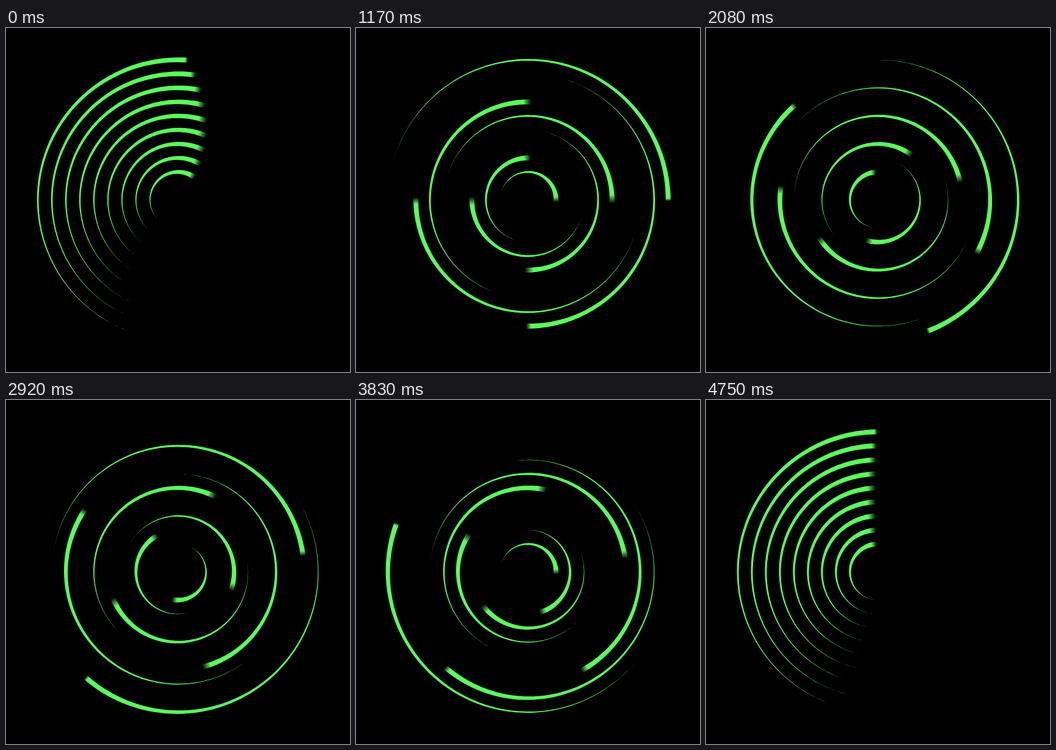
These frames come from a looping animation (540x540 px, 4.83 s). An HTML page with a canvas:

```html
<!DOCTYPE html>
<html lang="en">
<head>
<meta charset="utf-8">
<title>Green rings</title>
<style>
  html, body { margin: 0; width: 100%; height: 100%; overflow: hidden; background: #000; }
  canvas { display: block; width: 540px; height: 540px; }
</style>
</head>
<body>
<canvas id="stage" width="540" height="540"></canvas>
<script>
const ctx = document.getElementById('stage').getContext('2d');
const LOOP = 4830;        // ms
const CENTER = 270;
const RINGS = 9;
const GAP = 22;           // px between rings
const TRAIL = 165;        // degrees
const WIDTH = 7.8;        // px at the head
const BLUR = 0.6;         // half of the head's blur, degrees per turn
const STEPS = 110;
const rad = deg => (deg - 90) * Math.PI / 180;

// The picture holds at 12 steps per second, switching on whole centiseconds.
function stepAt(ms) {
  const next = Math.floor(ms * 0.012) + 1;
  return Math.round(next * 25 / 3) * 10 > ms ? next - 1 : next;
}

// Degrees turned by the slowest ring, moving in ticks of 33 ms.
function turnAt(step) {
  const tick = Math.ceil((step + 0.5) / 0.396) - 1;
  return tick * 2.47 + 0.95;
}

function strokeWidth(behind) {
  const left = Math.min(1, Math.max(0, 1 - behind / TRAIL));
  return WIDTH * Math.pow(left, 1.3);
}

function drawRing(radius, head, blur) {
  const span = TRAIL + blur;
  const at = (j, side) => {
    const behind = j / STEPS * span - blur;
    const r = radius + side * strokeWidth(behind) / 2;
    const a = rad(head - behind);
    ctx.lineTo(CENTER + r * Math.cos(a), CENTER + r * Math.sin(a));
  };
  ctx.beginPath();
  for (let j = 0; j <= STEPS; j++) at(j, 1);
  for (let j = STEPS; j >= 0; j--) at(j, -1);
  ctx.closePath();

  // Gradient starts well behind the tail so its seam stays hidden.
  const lead = 30;
  const fill = ctx.createConicGradient(rad(head - TRAIL - lead), CENTER, CENTER);
  const mid = TRAIL + lead;
  fill.addColorStop(0, 'rgba(90,255,90,1)');
  fill.addColorStop((mid - blur) / 360, 'rgba(90,255,90,1)');
  fill.addColorStop((mid + blur) / 360, 'rgba(90,255,90,0)');
  ctx.fillStyle = fill;
  ctx.fill();
}

function draw(now) {
  const turn = turnAt(stepAt(now % LOOP));
  ctx.fillStyle = '#000';
  ctx.fillRect(0, 0, 540, 540);
  // The outermost ring turns once per loop, each inner one once more.
  for (let k = 1; k <= RINGS; k++) {
    drawRing(GAP * (RINGS + 2 - k), (turn * k) % 360, BLUR * k);
  }
}

function loop() {
  draw(performance.now());
  requestAnimationFrame(loop);
}
loop();
</script>
</body>
</html>
```
